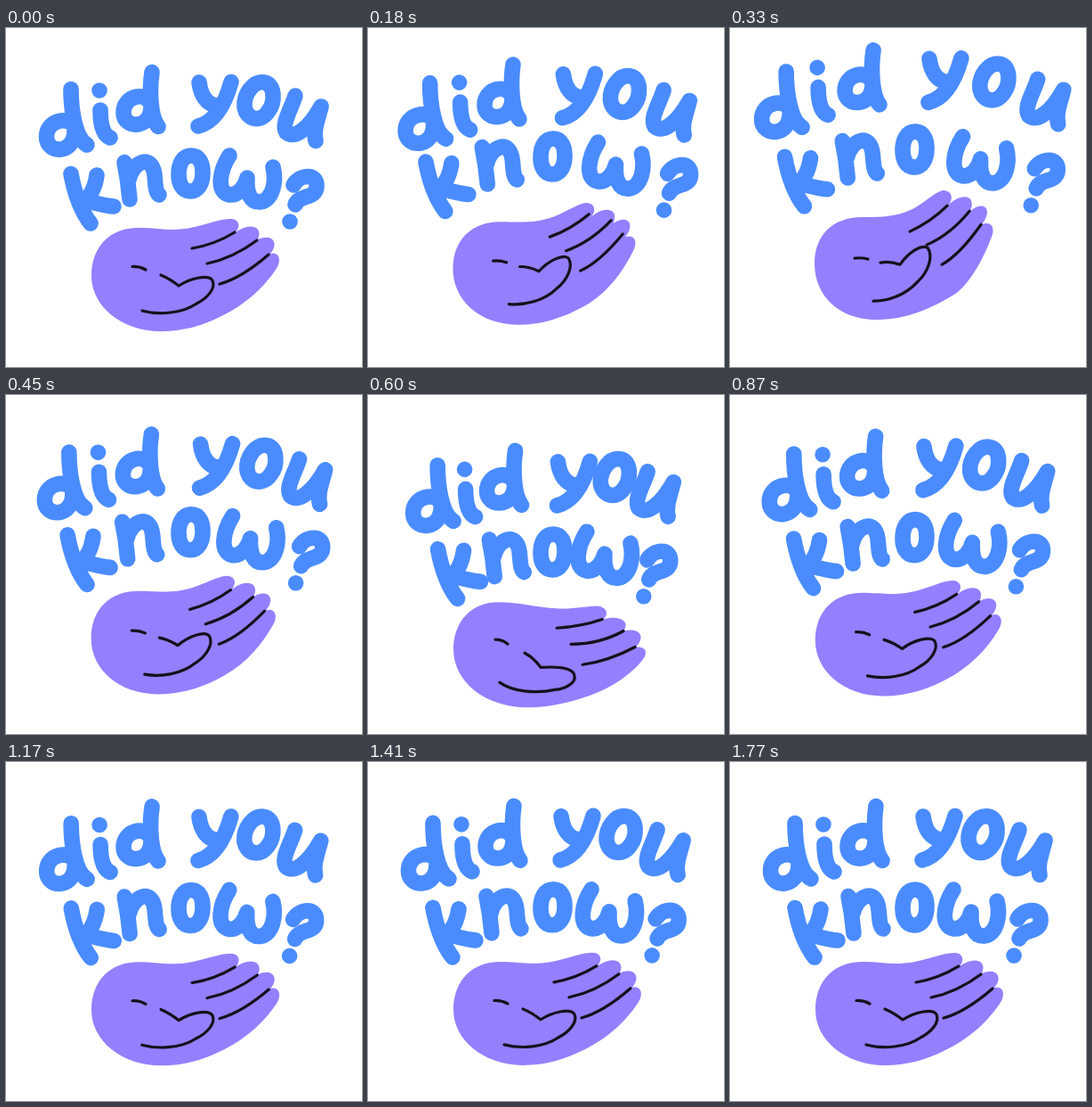
An HTML page that plays this animation: 400x380 px, repeating every 1.8 s.

```html
<!DOCTYPE html>
<html lang="en">
<head>
<meta charset="utf-8">
<title>did you know?</title>
<style>
  html, body { margin: 0; width: 100%; height: 100%; overflow: hidden; background: #fff; }
  svg { display: block; width: 100%; height: 100%; }
  path { stroke-linecap: round; stroke-linejoin: round; }
  #letters path { fill: none; stroke: #4a8cff; stroke-width: 17.6; }
  #hand path { fill: none; stroke: #15121c; stroke-width: 3.2; }
  #hand path:first-child { fill: #947fff; stroke: none; }
</style>
</head>
<body>
<svg viewBox="0 0 400 380" role="img" aria-label="did you know?">
  <g id="hand"></g>
  <g id="letters"></g>
</svg>
<script>
const LOOP = 1800, STEP = 30;
const OMEGA = 4 * Math.PI, DECAY = 5;
const HAND_DIP = 0.75;

// Each part swings up, drops through rest and rings out.
const palm = { start: 25, peak: 310, rest: 472, amp: 1.45 };
const creases = { start: 0, peak: 290, rest: 472, amp: 1.45 };
const topRow = { start: 70, peak: 350, rest: 468, amp: 1 };
const bottomRow = { start: 0, peak: 290, rest: 485, amp: 0.83 };

// Centre lines at rest, and the shift [dx, dy] at the top of the swing.
const letters = [
  [topRow, -10, -20, 'M73 68.5C73 90 77 123 91 131M77 111C71 98 45.5 103 45.5 122C45.5 142 78 142 77 114'],
  [topRow, -7, -26, 'M105 70h.01M106 92C106 108 109 120 117 123'],
  [topRow, -3, -25, 'M164 49.5C161 70 162 100 171 110.5M163 86C157 70 132 76 132 95C132 113 162 114 163 89'],
  [topRow, 7, -27, 'M217 61C219 76 226 86 237 87M253 60.5C247 82 236 105 216 110'],
  [topRow, 13, -21, 'M290 61C303 63 302 84 295 93C286 107 270 103 268 88C267 74 278 59 290 61Z'],
  [topRow, 21, -19, 'M325 76C320 92 309 108 315 117C324 125 340 113 354 88C350 104 345 115 348 126.5'],
  [bottomRow, -12, -20, 'M73 163.5C77 185 84 205 95 219M102 165C100 179 94 191 84 197M88 193C100 196 110 199 121 200'],
  [bottomRow, -7, -25, 'M133 150.5C136 165 138 180 139 192M138 170C142 150 164 140 167 165C168 176 168 184 172 187'],
  [bottomRow, 0, -28, 'M208 143C218 143 221 153 221 162C221 174 216 183 207 183C198 183 194 174 194 164C194 152 199 143 208 143Z'],
  [bottomRow, 11, -22, 'M251 143C240 160 236 184 251 187C262 188 269 176 271 168C270 184 274 196 286 195C300 192 304 172 300 156'],
  [bottomRow, 20, -19, 'M323 176C330 164 350 162 349 178C348 192 330 186 325 198M319 217h.01']
];

// Hand shapes as [rest, up, down]; the first is the silhouette.
const handShapes = [
  [
    'M96 278C96 244 118 224 148 224C175 224 185 229 212 223C228 219 242 214 252 214C262 214 264 222 258 229C272 218 290 221 283 237C298 230 308 240 297 253C306 250 311 260 303 271C290 290 270 310 240 324C222 333 200 340 174 340C130 340 96 312 96 278Z',
    'M95 264C95 232 116 212 148 212C172 212 185 212 205 203C217 197 230 184 239 182C250 182 252 192 244 200C258 184 278 186 270 205C286 192 296 204 283 220C294 216 298 224 294 234C285 258 272 282 256 296C232 312 200 327 165 327C122 327 95 300 95 264Z',
    'M96 285C96 254 116 232 146 232C172 232 190 238 212 239C230 240 246 236 257 236C270 237 270 247 264 251C280 246 296 252 287 264C302 260 314 268 301 282C314 281 314 290 308 297C296 312 274 328 248 337C228 344 204 350 180 350C130 350 96 320 96 285Z'
  ],
  ['M209 247Q234 243 257 229', 'M202 228Q226 217 244 199', 'M212 261Q240 259 263 251'],
  ['M226 264Q255 258 282 238', 'M221 243Q248 231 269 205', 'M228 279Q260 279 287 264'],
  ['M240 287Q265 280 295 254', 'M238 265Q258 254 282 220', 'M241 302Q270 298 300 282'],
  ['M142 267.5Q150 267 157 271', 'M140 258Q148 257 155 259', 'M143 274Q151 274 157 279'],
  [
    'M174 277Q184 281 194 289C208 280 228 276 232 283C236 292 226 303 214 309C198 320 172 322 153 317',
    'M169 263Q180 261 191 265C200 252 214 242 222 246C229 256 222 274 211 284C198 299 178 306 161 306',
    'M176 289Q186 294 194 305C210 304 230 304 232 314C234 322 222 329 210 330C188 335 162 332 148 322'
  ]
];

const NUMBER = /\d+(\.\d+)?/g;

function addPath(parentId, d) {
  const path = document.createElementNS('http://www.w3.org/2000/svg', 'path');
  path.setAttribute('d', d);
  document.getElementById(parentId).append(path);
  return path;
}

function swing({ start, peak, rest, amp }, t) {
  if (t <= start) return 0;
  if (t < peak) {
    const u = (t - start) / (peak - start);
    return u * u * (3 - 2 * u);
  }
  if (t < rest) {
    // The exponent makes the drop meet the ringing at the same speed.
    const power = amp * OMEGA * (rest - peak) / 1000;
    return 1 - ((t - peak) / (rest - peak)) ** power;
  }
  const s = (t - rest) / 1000;
  return -amp * Math.sin(OMEGA * s) * Math.exp(-DECAY * s);
}

function blend(from, to, k) {
  const ends = to.match(NUMBER);
  let i = 0;
  return from.replace(NUMBER, n => (+n + (ends[i++] - n) * k).toFixed(2));
}

const letterPaths = letters.map(([, , , d]) => addPath('letters', d));
const handPaths = handShapes.map(([rest]) => addPath('hand', rest));

function draw(t) {
  letters.forEach(([row, dx, dy], i) => {
    const q = swing(row, t);
    letterPaths[i].setAttribute('transform', `translate(${dx * q} ${dy * q})`);
  });
  handShapes.forEach(([rest, up, down], i) => {
    const q = swing(i ? creases : palm, t);
    const d = q >= 0 ? blend(rest, up, q) : blend(rest, down, -q / HAND_DIP);
    handPaths[i].setAttribute('d', d);
  });
}

const origin = performance.now();
function tick(now) {
  const t = Math.max(0, now - origin) % LOOP;
  draw(Math.floor(t / STEP) * STEP);
  requestAnimationFrame(tick);
}
draw(0);
requestAnimationFrame(tick);
</script>
</body>
</html>
```
